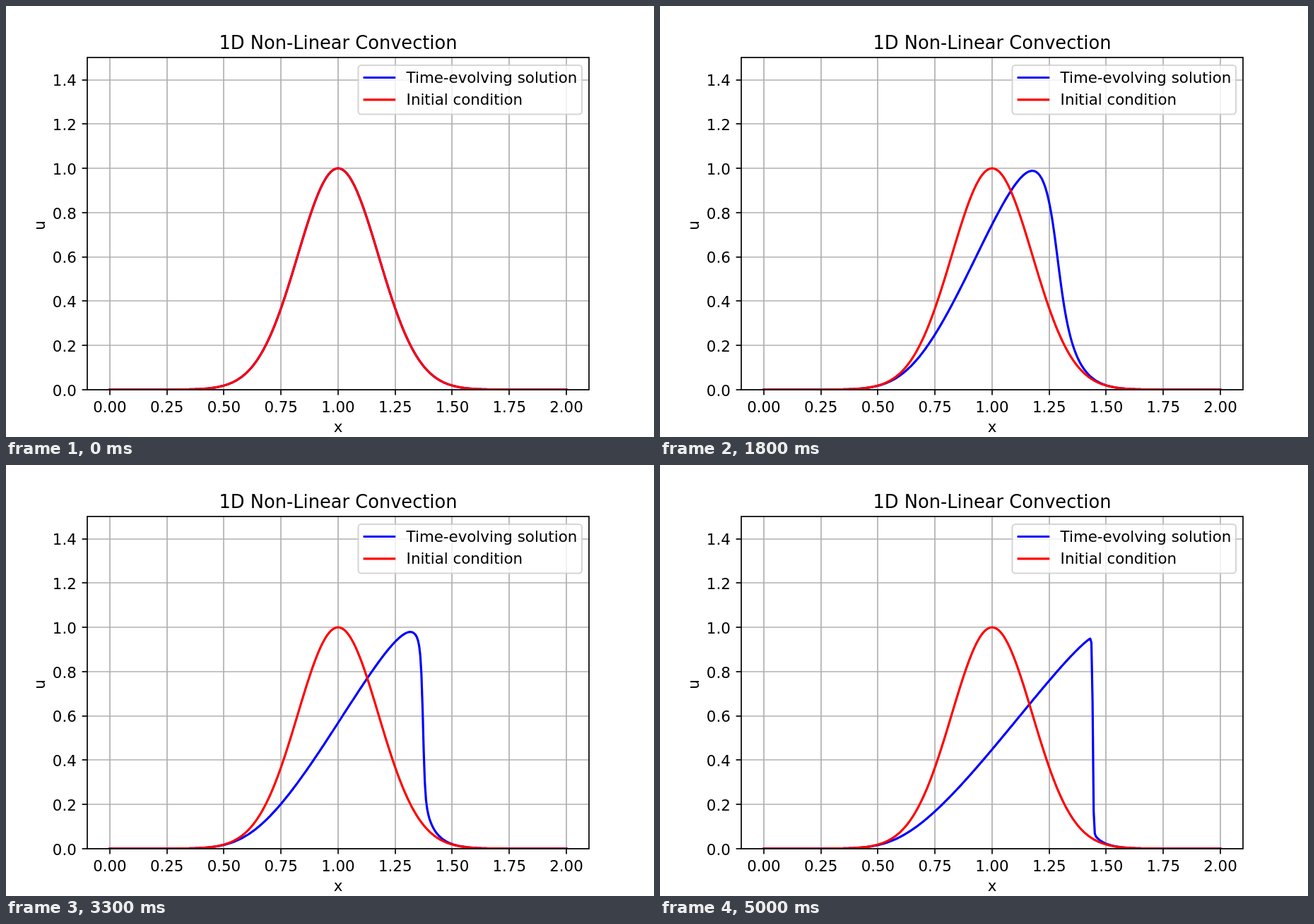
Write an HTML page that moves like this. It is 917 px wide and 611 px high and loops after 5100 ms.

```html
<!DOCTYPE html>
<html lang="en">
<head>
<meta charset="utf-8">
<title>1D Non-Linear Convection</title>
<style>
  html, body { margin: 0; width: 100%; height: 100%; overflow: hidden; background: #fff; }
  svg { display: block; width: 917px; height: 611px; }
  text { font: 21.35px "DejaVu Sans", sans-serif; fill: #000; }
  .title { font-size: 25.7px; }
  .mid { text-anchor: middle; }
  .end { text-anchor: end; }
  .grid { stroke: #b0b0b0; stroke-width: 1.7; }
  .axis { stroke: #000; stroke-width: 1.7; fill: none; }
  .curve { fill: none; stroke-width: 3.18; stroke-linecap: square; stroke-linejoin: round; }
  .blue { stroke: #00f; }
  .red { stroke: #f00; }
</style>
</head>
<body>
<svg viewBox="0 0 917 611">
  <clipPath id="plot"><rect x="114.6" y="73.3" width="710.7" height="470.5"/></clipPath>
  <g id="grid"></g>
  <g id="ticks"></g>
  <g clip-path="url(#plot)">
    <path id="wave" class="curve blue"/>
    <path id="start" class="curve red"/>
  </g>
  <rect class="axis" x="115" y="73" width="710" height="471"/>
  <g id="labels"></g>
  <text class="title mid" x="470" y="61">1D Non-Linear Convection</text>
  <text class="mid" x="470" y="604">x</text>
  <text class="mid" transform="translate(54.5 311) rotate(-90)">u</text>
  <rect x="498.5" y="84" width="316.5" height="69.5" rx="4.2" fill="#fff" fill-opacity=".8"
        stroke="#ccc" stroke-opacity=".8" stroke-width="2.1"/>
  <path class="curve blue" d="M507.2 101.5h42.4"/>
  <path class="curve red" d="M507.2 132.8h42.4"/>
  <text x="566.6" y="109">Time-evolving solution</text>
  <text x="566.6" y="140.4">Initial condition</text>
</svg>
<script>
  const FRAMES = 51, FRAME_MS = 100, STEPS = 10;
  const N = 401, DX = 2 / (N - 1), DT = 0.001;

  const px = x => 146.9 + 323.05 * x;
  const py = u => 543.8 - 313.65 * u;
  const byId = id => document.getElementById(id);

  function add(parent, tag, attrs, text) {
    const el = document.createElementNS('http://www.w3.org/2000/svg', tag);
    for (const key in attrs) el.setAttribute(key, attrs[key]);
    if (text) el.textContent = text;
    byId(parent).appendChild(el);
  }

  for (let i = 0; i <= 8; i++) {
    const x = Math.round(px(i / 4));
    add('grid', 'path', { class: 'grid', d: `M${x} 73V544` });
    add('ticks', 'path', { class: 'axis', d: `M${x} 544v7.4` });
    add('labels', 'text', { class: 'mid', x: px(i / 4), y: 576 }, (i / 4).toFixed(2));
  }
  for (let i = 0; i <= 7; i++) {
    const y = Math.round(py(i / 5));
    add('grid', 'path', { class: 'grid', d: `M115 ${y}H825` });
    add('ticks', 'path', { class: 'axis', d: `M115 ${y}h-7.4` });
    add('labels', 'text', { class: 'end', x: 99.8, y: py(i / 5) + 8.8 }, (i / 5).toFixed(1));
  }

  // Upwind step of u_t + u u_x = 0; right to left keeps the old left neighbour.
  function step(u) {
    for (let i = N - 1; i > 0; i--) u[i] -= DT / DX * u[i] * (u[i] - u[i - 1]);
  }

  const toPath = u =>
    'M' + u.map((v, i) => px(i * DX).toFixed(2) + ' ' + py(v).toFixed(2)).join('L');

  const u = Array.from({ length: N }, (_, i) => Math.exp(-(((i * DX - 1) / 0.25) ** 2)));
  const paths = [];
  for (let f = 0; f < FRAMES; f++) {
    paths.push(toPath(u));
    for (let s = 0; s < STEPS; s++) step(u);
  }

  const wave = byId('wave');
  byId('start').setAttribute('d', paths[0]);
  const t0 = performance.now();
  let shown = -1;

  function draw() {
    const f = Math.floor((performance.now() - t0) / FRAME_MS) % FRAMES;
    if (f !== shown) wave.setAttribute('d', paths[shown = f]);
    requestAnimationFrame(draw);
  }
  draw();
</script>
</body>
</html>
```
